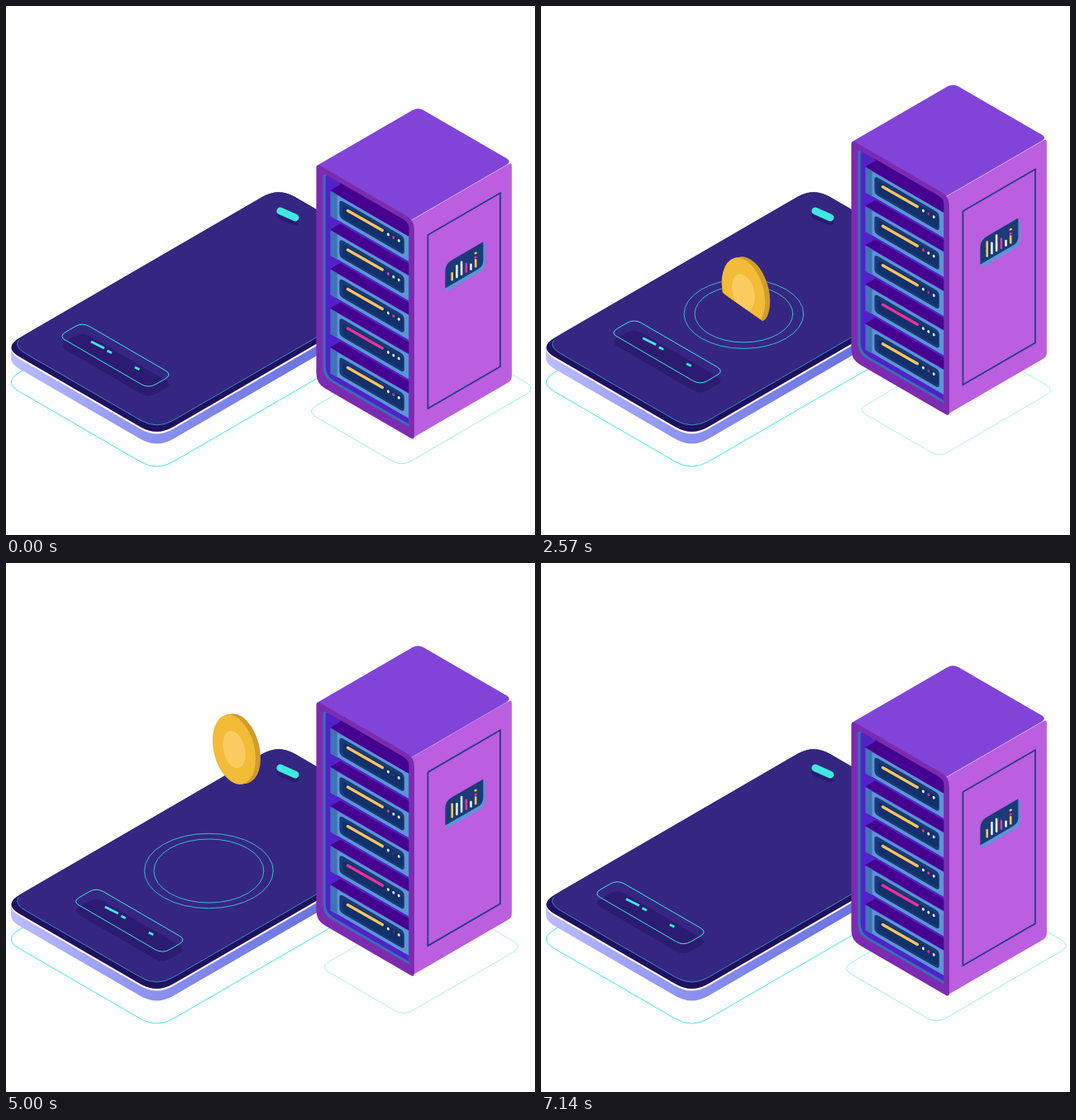
An HTML page with a canvas that plays this animation: 640 px wide and 640 px high, repeating every 7.21 s.

```html
<!DOCTYPE html>
<html lang="en">
<head>
<meta charset="utf-8">
<title>Phone and server</title>
<style>
html, body { margin: 0; width: 100%; height: 100%; overflow: hidden; background: #fff; }
canvas { display: block; width: 640px; height: 640px; }
</style>
</head>
<body>
<canvas id="stage" width="640" height="640"></canvas>
<script>
const ctx = document.getElementById('stage').getContext('2d');
const LOOP = 7210;
const SLOPE = .58;
const CYAN = '#3fe8e0', NAVY = '#1b3a78', WHITE = '#e4f4ff', YELLOW = '#fbc55c', PINK = '#ee2f9b';
const SHADE = 'rgba(30,10,90,.4)', BLUE = '#5b96d4', INDIGO = '#46008f';

const clamp = v => Math.max(0, Math.min(1, v));

// Isometric rectangles: on the floor from its left corner, or on a wall from its top left corner
const floor = (x, y, down, up) => [
  [x, y], [x + up, y - up * SLOPE],
  [x + up + down, y + (down - up) * SLOPE], [x + down, y + down * SLOPE]
];
const wall = (x, y, w, h, dir = 1) => {
  const end = y + dir * w * SLOPE;
  return [[x, y], [x + w, end], [x + w, end + h], [x, y + h]];
};
const shift = (points, dy) => points.map(([x, y]) => [x, y + dy]);

// Closed polygon; r is how far each corner's curve reaches along its edges
function shape(points, r = 0) {
  const n = points.length;
  ctx.beginPath();
  points.forEach((p, i) => {
    const d = Array.isArray(r) ? r[i] : r;
    const toward = q => {
      const k = d / Math.hypot(q[0] - p[0], q[1] - p[1]);
      return [p[0] + (q[0] - p[0]) * k, p[1] + (q[1] - p[1]) * k];
    };
    ctx.lineTo(...toward(points[(i + n - 1) % n]));
    ctx.quadraticCurveTo(...p, ...toward(points[(i + 1) % n]));
  });
  ctx.closePath();
}
function fill(color, points, r) {
  shape(points, r);
  ctx.fillStyle = color;
  ctx.fill();
}
function outline(color, width, points, r) {
  shape(points, r);
  ctx.strokeStyle = color;
  ctx.lineWidth = width;
  ctx.stroke();
}
function line(color, width, x0, y0, x1, y1, cap = 'round') {
  ctx.strokeStyle = color;
  ctx.lineWidth = width;
  ctx.lineCap = cap;
  ctx.beginPath();
  ctx.moveTo(x0, y0);
  ctx.lineTo(x1, y1);
  ctx.stroke();
}
function oval(color, x, y, rx, ry, angle = 0) {
  ctx.beginPath();
  ctx.ellipse(x, y, rx, ry, angle, 0, 2 * Math.PI);
  ctx.fillStyle = color;
  ctx.fill();
}
function group(draw, dx = 0, dy = 0, alpha = 1) {
  ctx.save();
  ctx.translate(dx, dy);
  ctx.globalAlpha *= alpha;
  draw();
  ctx.restore();
}

const PHONE = floor(-4, 412.5, 186, 333.5);
const SCREEN = floor(3.3, 408.4, 179, 326);
const PILL = floor(63, 399, 109, 29);

const side = ctx.createLinearGradient(6, 0, 380, 0);
side.addColorStop(0, '#bcbcff');
side.addColorStop(.47, '#8990ee');
side.addColorStop(1, '#6a72e0');

function drawPhone(t) {
  const corner = 23;
  outline(CYAN, 1, shift(PHONE, 42), corner);
  for (let d = 14.5; d > 2; d--) fill(side, shift(PHONE, d), corner);
  fill('#fff', shift(PHONE, 2.5), corner);
  fill('#1f1062', PHONE, corner);
  fill('#352682', SCREEN, corner);
  for (const peak of [3180, 6550])
    group(() => fill('rgb(40,235,200)', SCREEN, corner), 0, 0, .27 * clamp(1 - Math.abs(t - peak) / 550));
  group(() => {
    // Only the near edges catch the light
    shape(shift(PHONE, 2), corner);
    ctx.clip();
    outline('#35aebf', .8, SCREEN, corner);
  });
  line(SHADE, 9, 331.5, 253, 349.5, 260.5);
  line(CYAN, 9, 331.5, 247.5, 349.5, 255.5);
}

function drawRings(t) {
  for (const start of [0, 1600, 3150]) {
    const age = t - start;
    const r = 51.5 + .0081 * Math.max(0, Math.min(age, 3270));
    group(() => {
      ctx.beginPath();
      ctx.ellipse(245, 372, r, r * SLOPE, 0, 0, 2 * Math.PI);
      ctx.strokeStyle = '#3ccbd3';
      ctx.lineWidth = .9;
      ctx.stroke();
    }, 0, 0, clamp((age - 150) / 650) * clamp((3650 - age) / 250));
  }
}

function drawPill(lift, phase) {
  const dash = (x, y, length) => line(CYAN, 3, x, y, x + length, y + length * .5, 'butt');
  group(() => {
    fill(SHADE, shift(PILL, 11.5), 10);
    outline(CYAN, 1, PILL, 10);
    dash(102.5, 405.5, 16);
    dash(122, 416.5, 5.5);
    dash(155.5, 436.5, 5.5);
  }, 25 * lift, 3 * lift - 8.5 * Math.sin(phase));
}

function drawCoin(age, top, speed, drag) {
  const y = top + speed * age - drag * age * age;
  if (age < 0 || y > 450) return;
  const x = 244.5 + .51 * Math.max(0, 286 - y);
  const angle = -Math.min(15, 6 + (y - 167) * .14) * Math.PI / 180;
  const cut = .13 * Math.max(0, y - 342);
  group(() => {
    // The screen swallows everything below this edge
    shape(shift([[0, -99], [640, -99], [640, 115], [268, 380], [0, 192]], cut));
    ctx.clip();
    for (let d = 6; d > 0; d--) oval('#d09d2a', x + d, y - d / 6, 24.6, 43, angle);
    oval('#f2bb38', x, y, 24.6, 43, angle);
    oval('#fbcb5f', x, y, 13, 23, angle);
  }, 0, 0, clamp(age / 300));
}

function drawFootprint(lift) {
  const k = 1 - .175 * lift;
  const corners = floor(502 - 139 * k, 475.5 + 14.5 * k, 115 * k, 163 * k);
  group(() => outline('#8fe9e2', .9, corners, 14 * k), 0, 0, 1 - .25 * lift);
}

function drawUnit(i, phase) {
  fill(INDIGO, floor(392, 222.5, 95, 12));
  fill('#3f74b4', wall(392, 223, 8, 31));
  fill(BLUE, wall(400, 228, 87, 30));
  fill(NAVY, wall(403, 233.5, 78.5, 22), 5);
  fill('#12306a', wall(407, 240, 73, 15), 4);
  line(i === 3 ? PINK : YELLOW, 3.4, 413, 247, 455, 271);
  for (let j = 0; j < 3; j++) {
    const pink = i !== 3 && j === (i === 1 ? 0 : 1);
    const glow = j === 1 ? .5 + .5 * Math.cos(phase * (2 + (i * 2 + 3) % 4)) : 1;
    group(() => oval(pink ? PINK : WHITE, 462 + 6.4 * j, 276 + 3.7 * j, 1.4, 1.9, -.4), 0, 0, .2 + .8 * glow);
  }
}

function drawChart(lift) {
  fill(BLUE, wall(532.5, 313, 47, 32, -1), [8, 1, 8, 2]);
  fill(NAVY, wall(531, 311.5, 46, 29.5, -1), [9, 1, 7, 1]);
  [YELLOW, WHITE, WHITE, PINK, WHITE, YELLOW].forEach((color, i) => {
    const x = 539.3 + 5.7 * i, bottom = 330.7 - 3.2 * i;
    const rest = 10.4 + 5 * Math.sin(1.25 * i - .5);
    const growth = (4 + 7 * Math.cos(2.6 * i)) * (1 - i / 5);
    line(color, 2.6, x, bottom, x, bottom - rest - growth * lift);
  });
  line(PINK, 2.4, 567.3, 303.8, 568.3, 303.2);
  line(YELLOW, 2.4, 567.3, 298.8, 568.3, 298.2);
}

function drawServer(lift, phase) {
  group(() => {
    fill('#bb5ee0', wall(489, 259.5, 122.5, 264, -1), [0, 5, 5, 4]);
    fill('#8244d8', floor(375, 193, 114, 123), [4, 8, 8, 0]);
    fill('#7c2bb0', wall(375, 190, 118.5, 266), [6, 11, 5, 12]);
    fill('#3a6db5', wall(383, 201.5, 104, 247), [5, 7, 1, 12]);
    group(() => {
      shape(wall(386, 203, 101, 244), [4, 7, 1, 12]);
      ctx.clip();
      ctx.fillStyle = '#5022c8';
      ctx.fill();
      fill(INDIGO, wall(404, 200, 83, 30));
      for (let i = 0; i < 5; i++) group(() => drawUnit(i, phase), 0, 47.5 * i);
    });
    outline('#253a86', 1.8, wall(510, 276.5, 87.5, 210, -1));
    drawChart(lift);
  }, 0, -35.5 * lift);
}

function draw(t) {
  const phase = 2 * Math.PI * t / LOOP;
  const lift = (1 - Math.cos(phase)) / 2;
  ctx.clearRect(0, 0, 640, 640);
  group(() => {
    drawFootprint(lift);
    drawPhone(t);
    drawRings(t);
    drawPill(lift, phase);
    drawCoin(t - 500, 103, .1316, 6.9e-6);
    drawCoin(t - 3850, 80, .1261, 0);
    drawServer(lift, phase);
  }, .4, .5);
}

const begin = performance.now();
function tick() {
  draw((performance.now() - begin) % LOOP);
  requestAnimationFrame(tick);
}
tick();
</script>
</body>
</html>
```
